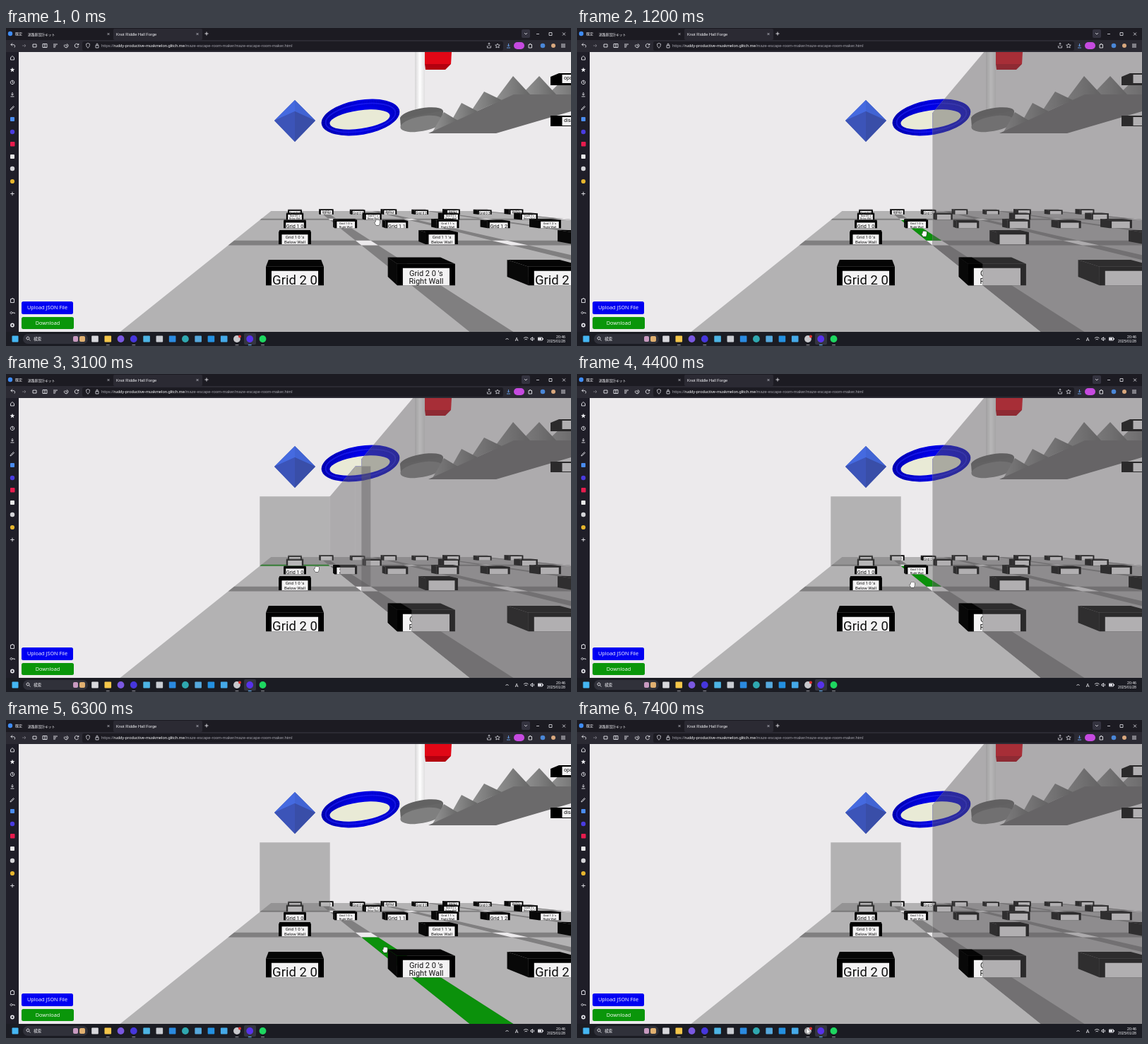
These frames come from a looping animation (800x450 px, 7.5 s). An HTML page with a canvas:

```html
<!DOCTYPE html>
<html lang="ja">
<head>
<meta charset="utf-8">
<style>
html, body { margin: 0; width: 100%; height: 100%; overflow: hidden; background: #1c1b22; }
canvas { display: block; }
</style>
</head>
<body>
<canvas id="stage" width="800" height="450"></canvas>
<script>
const g = document.getElementById('stage').getContext('2d');
const UI = '"Liberation Sans", "Noto Sans CJK JP", "Noto Sans CJK", sans-serif';
const LOOP = 7500, TAU = Math.PI * 2, FOCAL = 236, TOP = -1.48, STEP = 2.8125;

// Floor strips that can carry a wall: x range and depth range
const strips = {
  near: [1.25, 1.5625, 0.625, 3.125],
  mid: [1.25, 1.5625, 3.4375, 5.9375],
  back: [-1.25, 1.25, 5.9375, 6.25]
};
const wallTimes = { near: [[600, 5900], [6400, LOOP]], mid: [[1500, 4000]], back: [[2600, LOOP]] };
const hoverTimes = { near: [[400, 800], [5700, 6600]], mid: [[1000, 1800], [3600, 4500]], back: [[2200, 3400]] };
const path = [[0, 526, 275], [400, 548, 330], [700, 548, 330], [1200, 492, 291], [1600, 491, 290],
  [2300, 440, 276], [3100, 440, 276], [3700, 486, 291], [4100, 486, 291], [4400, 475, 298],
  [5300, 521, 376], [5800, 537, 325], [6500, 537, 325], [7300, 327, 440], [7500, 327, 440]];

const project = ([x, y, z]) => [409 + FOCAL * x / z, 232 + FOCAL * y / z];
const during = (spans, t) => spans.some(([a, b]) => t >= a && t < b);

function trace(pts) {
  pts.forEach(([x, y], i) => i ? g.lineTo(x, y) : g.moveTo(x, y));
  g.closePath();
}
function poly(pts, fill) {
  g.beginPath(); trace(pts);
  g.fillStyle = fill; g.fill();
}
function rect(x, y, w, h, fill, r = 0) {
  g.beginPath(); g.roundRect(x, y, w, h, r);
  g.fillStyle = fill; g.fill();
}
function oval(x, y, rx, ry, rot, fill) {
  g.beginPath(); g.ellipse(x, y, rx, ry, rot, 0, TAU);
  g.fillStyle = fill; g.fill();
}
const dot = (x, y, r, fill) => oval(x, y, r, r, 0, fill);
function line(d, color = '#e8e8ee', width = 0.9) {
  g.strokeStyle = color; g.lineWidth = width;
  g.stroke(new Path2D(d));
}
function text(s, x, y, size, fill = '#f4f4f8', align = 'left', family = UI) {
  g.font = `${size}px ${family}`;
  g.textAlign = align; g.fillStyle = fill;
  g.fillText(s, x, y);
}
function shade(x0, x1, ...colors) {
  const s = g.createLinearGradient(x0, 0, x1, 0);
  colors.forEach((c, i) => s.addColorStop(i / (colors.length - 1), c));
  return s;
}

function floorQuad([x0, x1, z0, z1], fill) {
  poly([[x0, 1, z0], [x1, 1, z0], [x1, 1, z1], [x0, 1, z1]].map(project), fill);
}

function labelBox(x, z, lines, withText) {
  const two = lines.length > 1, top = two ? 0.77 : 0.8, zf = z - 0.09, zb = z + 0.09;
  const l = x - 0.31, r = x + 0.31, d = FOCAL / zf;
  poly([[l, top, zf], [r, top, zf], [r, top, zb], [l, top, zb]].map(project), '#050505');
  if (l > 0) poly([[l, top, zf], [l, top, zb], [l, 1, zb], [l, 1, zf]].map(project), '#080808');
  poly([[l, top, zf], [r, top, zf], [r, 1, zf], [l, 1, zf]].map(project), '#000');
  const y = top + 0.045;
  poly([[x - 0.25, y, zf], [x + 0.25, y, zf], [x + 0.25, 1, zf], [x - 0.25, 1, zf]].map(project), '#f3f2f3');
  if (!withText) return;
  lines.forEach((s, i) => text(s, 409 + x * d, 232 + d * (two ? 0.898 + i * 0.087 : 0.99),
    d * (two ? 0.083 : 0.14), '#111', 'center', 'Roboto, sans-serif'));
}
const rightBox = (r, c, withText) =>
  labelBox(c * STEP + STEP / 2, 7.5 - r * STEP, [`Grid ${r} ${c} 's`, 'Right Wall'], withText);

function floor(hovered) {
  floorQuad([-1.25, 10, 0.6, 8.75], '#b3b2b3');
  for (const z of [5.9375, 3.125]) floorQuad([-1.25, 10, z, z + 0.3125], '#807f80');
  for (let c = 0; c < 4; c++) {
    const x = 1.25 + c * STEP;
    floorQuad([x, x + 0.3125, 0.6, 8.75], '#807f80');
    for (const z of [5.9375, 3.125]) floorQuad([x, x + 0.3125, z, z + 0.3125], '#eceaec');
  }
  for (const k of hovered) floorQuad(strips[k], '#0b910b');
}

function boxes(withText) {
  for (let r = 0; r < 3; r++) {
    for (let c = 3; c >= 0; c--) {
      rightBox(r, c, withText);
      labelBox(c * STEP, 7.5 - r * STEP, [`Grid ${r} ${c}`], withText);
    }
    if (r < 2) for (let c = 3; c >= 0; c--)
      labelBox(c * STEP, 6.094 - r * STEP, [`Grid ${r} ${c} 's`, 'Below Wall'], withText);
  }
}

function ring() {
  oval(502, 126.5, 56, 24.5, -0.17, shade(447, 557, '#0000b8', '#0000ec', '#0000ce'));
  g.lineWidth = 7; g.setLineDash([0.8, 1.6]); g.strokeStyle = 'rgba(0,0,90,.3)';
  g.beginPath(); g.ellipse(502, 127, 51, 20, -0.16, 0, TAU); g.stroke();
  g.setLineDash([]);
  g.lineWidth = 2; g.strokeStyle = 'rgba(40,40,255,.5)';
  g.beginPath(); g.ellipse(502, 127, 50, 19, -0.16, 0, TAU); g.stroke();
  oval(501, 129.5, 43, 13, -0.14, '#e9ead6');
}

function props(withText) {
  const tip = [409, 102], left = [380, 131], right = [438, 131], low = [409, 161], mid = [409, 118];
  poly([tip, left, low, right], '#3c53b4');
  poly([tip, left, mid], '#456ae0');
  poly([tip, mid, right], '#4164d4');
  poly([left, mid, low], '#3c54b8');
  poly([mid, right, low], '#394ea8');
  ring();

  rect(579, 34, 14, 84, shade(579, 593, '#d6d5d6', '#ffffff', '#e0dfe0'));
  oval(588.5, 123, 31, 9.5, -0.18, '#626262');
  poly([[558, 128], [619, 117], [618, 131], [559, 141]], '#666');
  oval(588.5, 135.5, 30.5, 10.5, -0.18, '#7f7f7f');

  poly([[593, 34], [631, 34], [630, 51], [593, 51]], '#e10716');
  poly([[593, 51], [630, 51], [622, 59], [594, 59]], '#b3000f');

  const spikes = [[792, 70, 767, 94, 817, 94], [755, 68, 730, 94, 779, 94], [718, 68, 688, 108, 742, 94],
    [677, 90, 655, 123, 702, 102], [645, 106, 628, 136, 668, 118], [620, 119, 604, 147, 640, 131]];
  for (const [x, y, x0, y0, x1, y1] of spikes)
    poly([[x, y], [x0, y0], [x1, y1]], shade(x0, x1, '#949494', '#7f7f7f', '#666'));
  poly([[598, 149], [719, 94], [800, 94], [800, 118], [694, 149]], '#6b6a6b');

  [[64, 'opa'], [124, 'disa']].forEach(([y, s], i) => {
    poly([[771, y + (i ? 0 : 5)], [783, y], [800, y], [800, y + 17 - i * 2], [771, y + 17 - i * 2]], '#000');
    rect(787.5, y + 2, 13, 12, '#f3f2f3');
    if (withText) text(s, 790, y + 9, 7, '#111', 'left', 'Roboto, sans-serif');
  });
}

function scene(hovered, withText) {
  rect(18, 34, 782, 396, '#eceaec');
  floor(hovered);
  props(withText);
  boxes(withText);
}

// Faces of each wall that the camera can see
function wallFaces(k) {
  const [x0, x1, z0, z1] = strips[k];
  const front = [[x0, 1, z0], [x1, 1, z0], [x1, TOP, z0], [x0, TOP, z0]].map(project);
  const side = [[x0, 1, z1], [x0, 1, z0], [x0, TOP, z0], [x0, TOP, z1]].map(project);
  return k === 'near' ? [side] : k === 'back' ? [front] : [side, front];
}

// The half of a label box that stands out in front of a side wall
function outstandingBox(row) {
  const z = 7.5 - row * STEP;
  const f = project([1.25, 0.77, z - 0.09]), b = project([1.25, 0.77, z + 0.09]);
  g.save(); g.beginPath();
  trace([[18, b[1] - 2], [b[0], b[1] - 2], b, f, [f[0], 430], [18, 430]]);
  g.clip(); rightBox(row, 0, true); g.restore();
}

function room(t) {
  const hovered = Object.keys(strips).filter(k => during(hoverTimes[k], t));
  const walls = ['back', 'mid', 'near'].filter(k => during(wallTimes[k], t));
  g.save();
  g.beginPath(); g.rect(18, 34, 782, 396); g.clip();
  scene(hovered, true);
  if (walls.length) {
    g.save(); g.beginPath();
    walls.flatMap(wallFaces).forEach(trace);
    g.clip(); scene(hovered, false); g.restore();
    for (const k of walls)
      for (const face of wallFaces(k)) poly(face, k === 'back' ? 'rgba(110,109,110,.45)' : 'rgba(95,94,95,.45)');
    if (walls.includes('mid')) outstandingBox(1);
    if (walls.includes('near')) outstandingBox(2);
  }
  g.restore();
  rect(22, 387, 73, 18, '#0000f2', 2.5);
  rect(22, 409, 74, 17, '#0a960a', 2.5);
  text('Upload JSON File', 58.5, 398.3, 7.3, '#fff', 'center', '"Open Sans", sans-serif');
  text('Download', 59, 420, 7.3, '#fff', 'center', '"Open Sans", sans-serif');
}

function browser() {
  rect(0, 0, 800, 17, '#1c1b22');
  rect(152, 1, 126, 16, '#2b2a33', 2);
  rect(0, 17, 800, 17, '#2b2a33');
  rect(108, 19, 596, 13, '#1c1b22', 2.5);
  rect(0, 34, 18, 396, '#1f1e28');
  dot(6, 8, 3.2, '#3f8cf4');
  text('既定', 13, 10.3, 5);
  text('迷路庭設計キット', 31, 10.5, 4.8);
  text('Knot Riddle Hall Forge', 156, 10.5, 5.7);
  for (const x of [145, 271]) line(`M${x - 1.5} 7l3 3m0-3l-3 3`, '#d0d0d8', 0.7);
  line('M284 5.5v5m-2.5-2.5h5');
  rect(730, 2, 12, 12, '#34333f', 2);
  line('M734 7l2 2 2-2M751 8.5h4M769 6.5h4v4h-4zM788 6.5l4 4m0-4l-4 4', '#e8e8ee', 0.8);

  line('M12 27.5c2-4-1-4-5-4m2-2l-2 2 2 2M38 23h5v4h-5z', '#e8e8ee');
  line('M23 25h5m-2-2l2 2-2 2', '#77767f');
  line('M52 22.5h6v5h-6zM55 22.5v5M67 23h6m-6 2h4m-4 2h3M86 22.5a2.7 2.7 0 1 1-3 1M85 23v2l1.5 1M102.5 24a2.7 2.7 0 1 0 0 2m.3-4v2h-2');
  line('M113.5 22.5l2.5-1 2.5 1c0 3-1 5-2.5 5.7c-1.500-.7-2.500-2.700-2.500-5.700zM127 24.500h4v3.500h-4zM128 24.500v-1.500a1 1 0 0 1 2 0v1.500', '#d8d8e0', 0.8);
  const parts = [['https://', '#a5a4ad'], ['ruddy-productive-muskmelon.glitch.me', '#fbfbfe'],
    ['/maze-escape-room-maker/maze-escape-room-maker.html', '#a5a4ad']];
  let x = 135;
  for (const [s, color] of parts) {
    text(s, x, 27.4, 5.85, color);
    x += g.measureText(s).width;
  }
  line('M681.5 25v3h5v-3M684 26v-5m-1.5 1.500l1.500-1.500 1.500 1.500M696 22l1 2 2.300.2-1.700 1.500.5 2.300-2.100-1.200-2.100 1.200.5-2.300-1.700-1.500 2.300-.2z', '#d8d8e0', 0.8);
  line('M711.500 22v4m-1.500-1.500l1.500 1.500 1.500-1.500M709 28h5', '#6aa8f8');
  rect(719, 20, 15, 10, '#c64ae0', 5);
  line('M740 23.500h1.500v-1h1.500v1h1.500v4.500h-4.500z', '#e8e8ee');
  dot(760, 25, 3.3, '#4a87d8');
  dot(775, 25, 3, '#d9a87e');
  line('M786 23h6m-6 2h6m-6 2h6');
}

function sidebar() {
  line('M6.500 42l2.500-2.500 2.500 2.500v3h-5zM9 74.200a2.700 2.700 0 1 0 .01 0M9 75v2l1.300.8M9 91v4m-1.700-1.500l1.700 1.600 1.700-1.600M6.500 97h5M6.500 114.500l4-4 1 1-4 4-1.500.4zM9 231.800v5.400m-2.700-2.700h5.400');
  poly([...Array(10)].map((_, i) => {
    const a = i * TAU / 10 - TAU / 4, r = i % 2 ? 1.5 : 3.5;
    return [9 + r * Math.cos(a), 59.3 + r * Math.sin(a)];
  }), '#f0f0f4');
  rect(6, 126, 6, 6, '#4a8cf0', 1);
  dot(9, 147, 3.2, '#4a3ce0');
  rect(6, 161, 6.5, 6.5, '#e81c4e', 1);
  rect(6, 179, 6, 6, '#e8e8e8', 1);
  dot(9, 199, 3.2, '#d4d4d8');
  dot(9, 217, 3.1, '#e6b52e');
  line('M6.500 383.500h2v-1h1.500v1h1.500v5h-5zM9 403h3.300v1.200M7.500 401.600a1.400 1.400 0 1 0 .01 0');
  dot(9, 420.5, 2.9, '#e8e8ee');
  dot(9, 420.5, 1.2, '#1f1e28');
}

function taskbar() {
  rect(0, 430, 800, 20, '#1b1c23');
  rect(8.5, 435.5, 9, 9, '#45b6f2', 1);
  rect(24, 433, 92, 14, '#30313a', 7);
  line('M31 437a2 2 0 1 0 .01 0M32.500 440.500l2 2');
  text('検索', 39, 442.2, 5.6);
  rect(95, 436, 7, 8, '#c89ac0', 2);
  rect(104, 436, 8, 8, '#e0b070', 2);
  rect(337, 432, 17, 16, '#343541', 2);
  const colors = ['#d8d8dc', '#f4c64a', '#7a58e0', '#4636dc', '#4db4e4', '#c9ccd2', '#2b8ae0',
    '#2fa8b0', '#55a8dc', '#2490e0', '#45a9e8', '#c8c8cc', '#5732ea', '#1ed760'];
  colors.forEach((c, i) => {
    const x = 126 + i * 18.27;
    if ([2, 3, 7, 11, 12, 13].includes(i)) dot(x, 440, 4.9, c);
    else rect(x - 4.8, 435.5, 9.6, 9, c, 1);
    if ([1, 3, 11, 12, 13].includes(i)) rect(x - 2.5, 448, 5, 1, i === 12 ? '#63b4f4' : '#92929a', 0.5);
  });
  dot(331, 436.5, 2, '#e03030');
  line('M707.500 441l2-2 2 2');
  text('A', 723, 442.5, 7, '#f4f4f8', 'center');
  line('M733 439a4.500 4.500 0 0 1 6.500 0M734.500 441a2.600 2.600 0 0 1 3.500 0M743 439h1l1.500-1.500v5l-1.500-1.500h-1zM747 438.500q1.300 1.500 0 3M753.500 438h6v4h-6zM760.500 439v2');
  rect(754, 438.5, 4, 3, '#e8e8ee');
  text('20:46', 792, 438.6, 5.2, '#f4f4f8', 'right');
  text('2025/01/28', 792, 445.4, 5.2, '#f4f4f8', 'right');
}

function cursor(t) {
  const i = path.findIndex((k, n) => n && t < k[0]);
  const [t0, x0, y0] = path[i - 1], [t1, x1, y1] = path[i];
  const u = (t - t0) / (t1 - t0), e = u * u * (3 - 2 * u);
  const x = x0 + (x1 - x0) * e, y = y0 + (y1 - y0) * e;
  const shape = new Path2D(y > 430
    ? 'M-2-4v8l2-1.700 1.200 2.700 1.200-.6-1.200-2.600h2.600z'
    : 'M-2 4l-2-3.500q0-1 1.300-.4l.4-3.100q.8-.8 1.300 0q.8-1.300 1.400 0q.9-.9 1.400.2q1-.5 1.300.5v2.800l-.9 3.500z');
  g.save(); g.translate(x, y);
  g.strokeStyle = '#222'; g.lineWidth = 1; g.fillStyle = '#fff';
  g.stroke(shape); g.fill(shape);
  g.restore();
}

function draw(now) {
  const t = Math.floor(now % LOOP / 100) * 100;
  room(t);
  browser();
  sidebar();
  taskbar();
  cursor(t);
}
const start = performance.now();
function tick() {
  draw(performance.now() - start);
  requestAnimationFrame(tick);
}
tick();
</script>
</body>
</html>
```
